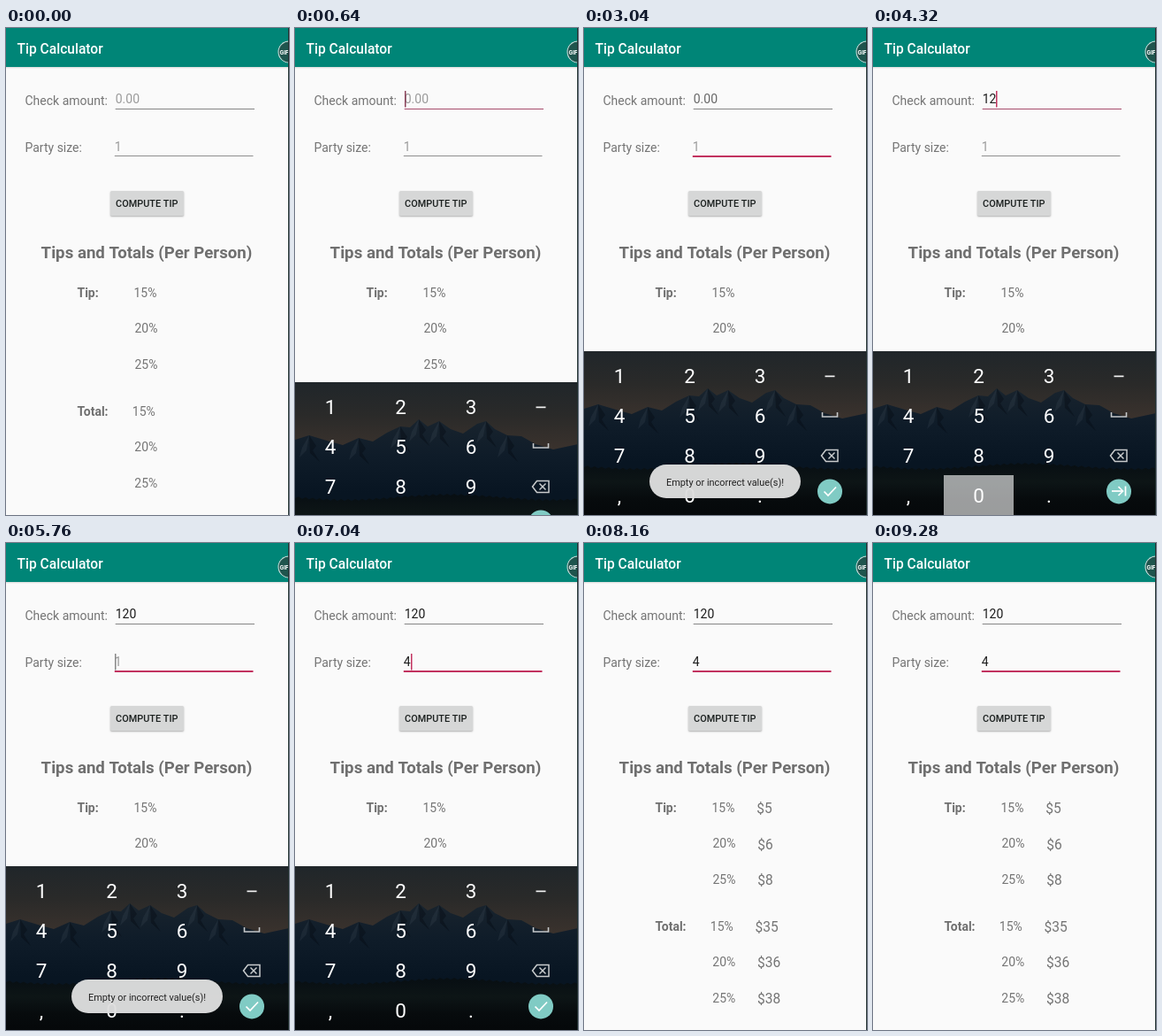
An HTML page with a canvas for the animation above (9.6 s loop, 320 by 550 pixels).

```html
<!DOCTYPE html>
<html lang="en">
<head>
<meta charset="utf-8">
<title>Tip Calculator</title>
<style>
html, body { margin: 0; width: 100%; height: 100%; overflow: hidden; background: #fafafa; }
canvas { display: block; width: 320px; height: 550px; }
</style>
</head>
<body>
<canvas id="stage"></canvas>
<script>
const LOOP = 9600, STEP = 160;
const W = 320, H = 550, KEYS_TOP = 365;
const GRAY = '#757575', HINT = '#9b9b9b', INK = '#1c1c1c', PINK = '#c2325f';
const canvas = document.getElementById('stage');
const ctx = canvas.getContext('2d');
const ratio = window.devicePixelRatio || 1;
canvas.width = W * ratio;
canvas.height = H * ratio;
ctx.scale(ratio, ratio);

const within = (t, a, b) => t >= a && t < b;

function text(str, x, y, size, color, weight = 400, align = 'left') {
  ctx.font = `${weight} ${size}px Roboto, sans-serif`;
  ctx.fillStyle = color;
  ctx.textAlign = align;
  ctx.fillText(str, x, y);
}

function rect(x, y, w, h, color) {
  ctx.fillStyle = color;
  ctx.fillRect(x, y, w, h);
}

function line(points, color, width = 1.5, close = false) {
  ctx.beginPath();
  points.forEach(([x, y]) => ctx.lineTo(x, y));
  if (close) ctx.closePath();
  ctx.strokeStyle = color;
  ctx.lineWidth = width;
  ctx.stroke();
}

function fill(points, color) {
  ctx.beginPath();
  points.forEach(([x, y]) => ctx.lineTo(x, y));
  ctx.fillStyle = color;
  ctx.fill();
}

function disc(x, y, r, color) {
  ctx.beginPath();
  ctx.arc(x, y, r, 0, Math.PI * 2);
  ctx.fillStyle = color;
  ctx.fill();
}

function pill(x, y, w, h, r, color) {
  ctx.beginPath();
  ctx.roundRect(x, y, w, h, r);
  ctx.fillStyle = color;
  ctx.fill();
}

function shade(y0, y1, ...colors) {
  const g = ctx.createLinearGradient(0, y0, 0, y1);
  colors.forEach((c, i) => g.addColorStop(i / (colors.length - 1), c));
  return g;
}

function amountAt(t) {
  if (t < 3680) return '';
  return t < 4000 ? '1' : t < 4480 ? '12' : '120';
}

function focusAt(t) {
  if (t < 480) return '';
  if (t < 2560) return 'amount';
  if (t < 3200) return 'party';
  return t < 5600 ? 'amount' : 'party';
}

function cursorAt(t) {
  if (within(t, 3040, 3200) || within(t, 5600, 5760) || within(t, 6240, 6720)) return false;
  if (within(t, 7200, 7680) || within(t, 8160, 8800)) return false;
  return t >= 640 && t < 9280;
}

function keyAt(t) {
  if (within(t, 3520, 3680)) return [0, 0];
  if (within(t, 3840, 4000)) return [1, 0];
  if (within(t, 4320, 4480)) return [1, 3];
  if (within(t, 6720, 6880)) return [0, 1];
  return null;
}

// Distance the keyboard is pushed down from its open position
function keyboardDrop(t) {
  if (t < 480 || t >= 8160) return H;
  if (t < 640) return 140;
  if (t < 800) return 35;
  return t >= 8000 ? 95 : 0;
}

function toastAlpha(t) {
  if (within(t, 1600, 1760) || within(t, 4960, 5120)) return 0.44;
  if (within(t, 1760, 3200) || within(t, 5120, 6240)) return 0.96;
  return 0;
}

const buttonDown = t => within(t, 1440, 1920) || within(t, 4800, 5280) || within(t, 7200, 7680);
const actionDown = t => within(t, 2400, 2560) || within(t, 5440, 5600);

function header() {
  rect(0, 44, W, 2, shade(44, 46, 'rgba(0,0,0,.14)', 'rgba(0,0,0,0)'));
  rect(0, 0, W, 44, '#008577');
  text('Tip Calculator', 12.5, 28.8, 15.57, '#fff', 500);
}

function recorder() {
  disc(320, 27, 12.5, '#d5e4e2');
  disc(320, 27, 11.5, '#1f554e');
  text('GIF', 309.5, 29.5, 6.5, '#fff', 700);
  rect(319, 0, 1, H, '#20302f');
}

function field(x, y, w, value, hint, hintColor, stroke, weight) {
  text(value || hint, x, y, 14, value ? INK : hintColor);
  rect(x, Math.round(y) + (y > 100 ? 5 : 6), w, weight, stroke);
}

function caret(x, y, color) {
  rect(Math.round(x), Math.round(y) - 14, 1.5, 18.5, color);
}

function form(t) {
  const amount = amountAt(t), party = t >= 6880 ? '4' : '';
  const focus = focusAt(t);
  const early = focus === 'amount' && t < 2560;
  text('Check amount:', 21.5, 87, 14, GRAY);
  text('Party size:', 21.5, 140, 14, GRAY);
  field(123.7, 85, 157.3, amount, '0.00', within(t, 2560, 3200) ? '#686868' : HINT,
    focus === 'amount' ? '#a64c6c' : '#858585', 1);
  field(122.8, 139, 156.7, party, '1', HINT,
    focus === 'party' ? PINK : '#8e8e8e', focus === 'party' ? 2 : 1);
  if (focus && cursorAt(t)) {
    const value = focus === 'amount' ? amount : party;
    ctx.font = '400 14px Roboto, sans-serif';
    const shift = ctx.measureText(value).width;
    if (focus === 'amount') caret(123.7 + shift, 85, early ? '#8a4058' : PINK);
    else caret(122.8 + shift, 139, within(t, 5760, 6240) ? '#888' : PINK);
  }

  ctx.save();
  ctx.shadowColor = 'rgba(0,0,0,.3)';
  ctx.shadowBlur = 2 * ratio;
  ctx.shadowOffsetY = ratio;
  pill(118, 184, 83, 28, 1.5, buttonDown(t) ? '#b9baba' : '#d6d7d7');
  ctx.restore();
  text('COMPUTE TIP', 159.3, 202, 10.9, '#1a1f1e', 500, 'center');
}

function results(t) {
  text('Tips and Totals (Per Person)', 159, 260, 18.68, '#6f6f6f', 700, 'center');
  text('Tip:', 80.5, 303.5, 14, '#6f6f6f', 700);
  text('Total:', 80.5, 437.5, 14, '#6f6f6f', 700);
  const check = 120, party = 4;
  [15, 20, 25].forEach((rate, i) => {
    const y = 303.5 + 40.5 * i;
    const tip = Math.ceil(check / party * rate / 100);
    const nudge = i ? 1 : 0;
    text(rate + '%', 144.4 + nudge, y, 14, GRAY);
    text(rate + '%', 142.8 + nudge * 2.5, y + 134, 14, GRAY);
    if (t >= 7360) {
      text('$' + tip, 195.2 + nudge, y + 1.8, 15.57, GRAY);
      text('$' + (check / party + tip), 193.5 + nudge * 2.5, y + 135, 15.57, GRAY);
    }
  });
}

function landscape() {
  rect(0, KEYS_TOP, W, H - KEYS_TOP, shade(KEYS_TOP, 440, '#20262a', '#2a2a29', '#3a322d'));
  const ridge = [[0, 430], [16, 425], [36, 431], [54, 436], [72, 428], [88, 432], [104, 422],
    [119, 415], [130, 416], [140, 407], [150, 415], [163, 409], [176, 418], [190, 423],
    [206, 412], [216, 409], [226, 418], [240, 425], [256, 426], [272, 435], [292, 441], [320, 435]];
  fill([...ridge, [320, H], [0, H]], shade(405, 490, '#19242e', '#0f1c29', '#081522'));
  [[140, 407], [163, 409], [216, 409], [72, 428], [240, 425], [16, 425], [119, 415]].forEach(([x, y]) => {
    fill([[x, y], [x + 8, y + 12], [x + 4, y + 17], [x + 12, y + 30], [x + 1, y + 20]], 'rgba(4,10,17,.4)');
    fill([[x, y], [x - 8, y + 14], [x - 11, y + 25], [x - 3, y + 17]], 'rgba(91,108,122,.15)');
  });
  const trees = [];
  for (let x = 0; x <= W; x += 4) trees.push([x, 494 + 3 * Math.sin(x / 37) + (x % 8 ? 0 : 2)]);
  fill([...trees, [320, H], [0, H]], shade(494, H, '#080f13', '#0d1516', '#070b0d', '#05080a'));
}

function keyboard(t) {
  const drop = keyboardDrop(t);
  if (drop >= H) return;
  ctx.save();
  ctx.translate(0, drop);
  landscape();
  const key = keyAt(t);
  if (key) rect(key[0] * 79.5 + 0.5, 370 + key[1] * 45, 79, 45, 'rgba(255,255,255,.6)');
  ['123', '456', '789', ',0.'].forEach((row, r) =>
    [...row].forEach((c, i) => text(c, 40 + 79.5 * i, 401 + 45 * r, 22.5, '#fff', 400, 'center')));
  rect(272.5, 392.5, 11, 1.7, '#f0f0f0');
  line([[269.5, 434], [269.5, 439], [286.5, 439], [286.5, 434]], '#c5c8ca', 1.6);
  line([[268.5, 483], [273.5, 476.5], [287, 476.5], [287, 489.5], [273.5, 489.5]], '#c9cccd', 1.5, true);
  line([[276.5, 479.5], [283.5, 486.5]], '#c9cccd');
  line([[283.5, 479.5], [276.5, 486.5]], '#c9cccd');
  disc(278, 523.4, 14, actionDown(t) ? '#a7dcd7' : '#80cbc4');
  if (focusAt(t) === 'party') {
    line([[271.5, 523.5], [276, 528], [285, 518.5]], '#fff', 1.7);
  } else {
    line([[270, 523], [282, 523]], '#fff', 1.7);
    line([[277.5, 518], [282.5, 523], [277.5, 528]], '#fff', 1.7);
    line([[285.5, 517.5], [285.5, 528.5]], '#fff', 1.7);
  }
  ctx.restore();
}

function toast(t) {
  const alpha = toastAlpha(t);
  if (!alpha) return;
  ctx.save();
  ctx.globalAlpha = alpha;
  pill(74, 493, 171, 38, 19, '#dedede');
  ctx.globalAlpha = Math.min(1, alpha * 1.8);
  text('Empty or incorrect value(s)!', 159.5, 516.5, 10.9, '#222', 400, 'center');
  ctx.restore();
}

function draw(now) {
  const t = Math.floor((now % LOOP) / STEP) * STEP;
  rect(0, 0, W, H, '#fafafa');
  header();
  form(t);
  results(t);
  keyboard(t);
  toast(t);
  recorder();
}

const start = performance.now();
function tick() {
  draw(performance.now() - start);
  requestAnimationFrame(tick);
}
tick();
</script>
</body>
</html>
```
